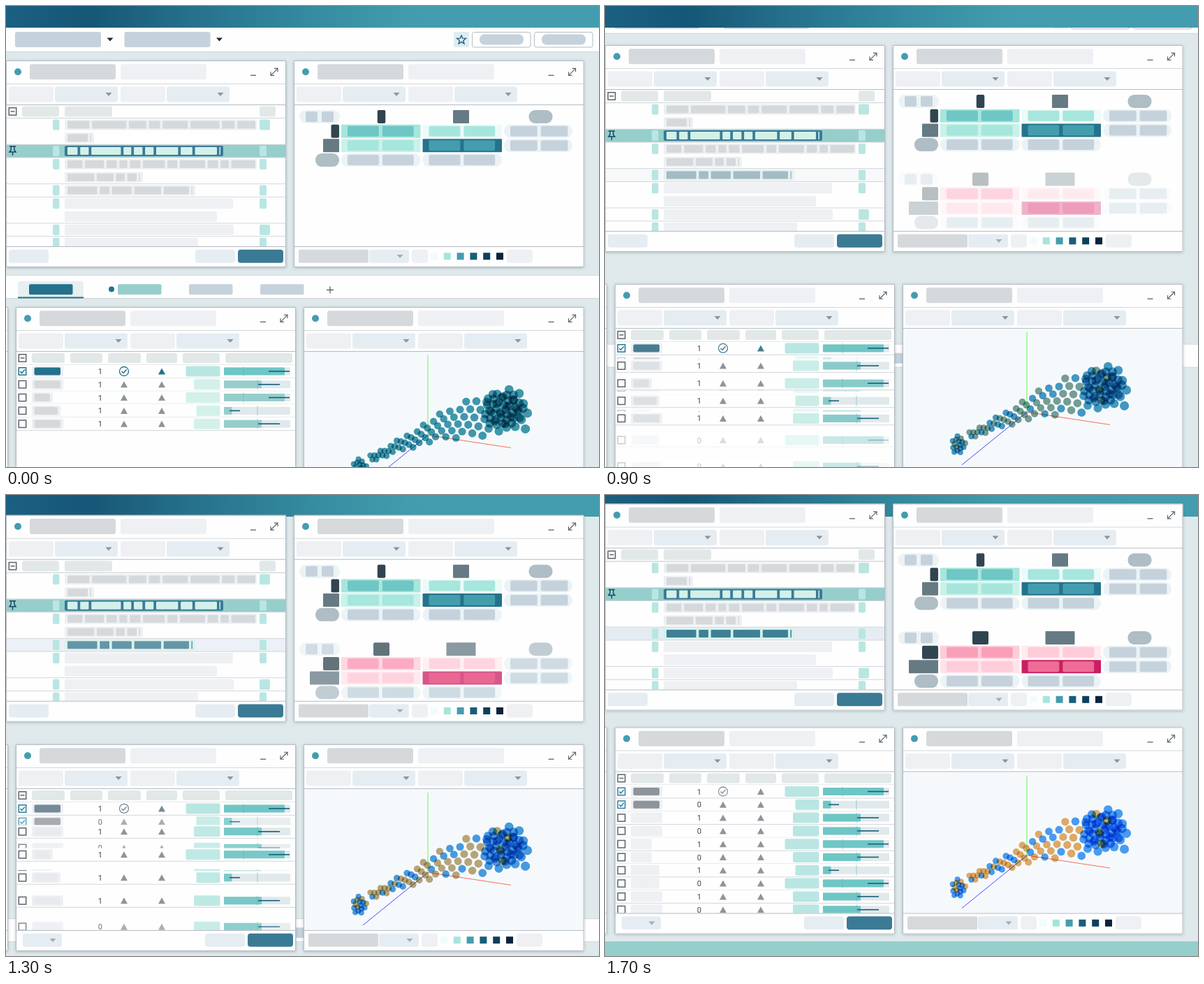
An HTML page with a canvas for the animation above (2000 ms loop, 849 by 660 pixels).

```html
<!DOCTYPE html>
<html lang="en">
<head>
<meta charset="utf-8">
<title>Dashboard transition</title>
<style>
html, body { margin: 0; width: 849px; height: 660px; overflow: hidden; }
canvas { display: block; }
</style>
</head>
<body>
<canvas id="stage" width="849" height="660"></canvas>
<script>
const c = document.getElementById('stage').getContext('2d');

const WHITE = '#fefefe', BG = '#dfe9eb', RULE = '#d3d7da', EDGE = '#b4bbc2';
const GREY = '#d6d9db', PALE = '#eef0f3', MIST = '#e5edf3', SLATE = '#c5d2dc', HEAD = '#e2e8e8';
const TEAL = '#24728c', STEEL = '#3b7a95', SEA = '#96cecc', AQUA = '#b9e6e2', MINT = '#d3f1ea';
const CYAN = '#6ec6c5', OCEAN = '#439dad', NAVY = '#175d7b', INK = '#5c6468', ASH = '#8e949a';
const PITCH = 18.8, FIRST_ROW = 92;

// [tick, progress]; the motion starts abruptly at the first key.
const KEYS = [[20, .07], [24, .204], [30, .463], [39, .752], [45, .911], [51, 1]];

function slope(i) {
  const a = KEYS[Math.max(i - 1, 0)], b = KEYS[Math.min(i + 1, KEYS.length - 1)];
  return (b[1] - a[1]) / (b[0] - a[0]);
}
function progressAt(tick) {
  if (tick < 20) return 0;
  if (tick >= 51) return 1;
  const i = KEYS.findIndex(k => k[0] > tick);
  const [t0, p0] = KEYS[i - 1], [t1, p1] = KEYS[i];
  const d = t1 - t0, s = (tick - t0) / d, r = 1 - s;
  return r * r * ((1 + 2 * s) * p0 + s * d * slope(i - 1)) + s * s * ((3 - 2 * s) * p1 - r * d * slope(i));
}

const fract = x => x - Math.floor(x);
const noise = x => fract(Math.sin(x * 12.9898) * 43758.5453);
const lerp = (a, b, p) => a + (b - a) * p;

function mix(a, b, p) {
  const channel = i => Math.round(lerp(parseInt(a.substr(i, 2), 16), parseInt(b.substr(i, 2), 16), p));
  return `rgb(${channel(1)},${channel(3)},${channel(5)})`;
}

// Rounded box from x0 to x1, centred on y.
function box(x0, x1, y, h, color, r = 2) {
  c.fillStyle = color;
  c.beginPath();
  c.roundRect(x0, y - h / 2, x1 - x0, h, r);
  c.fill();
}
function stroke(color, width, ...paths) {
  c.strokeStyle = color;
  c.lineWidth = width;
  c.beginPath();
  for (const path of paths)
    for (let i = 0; i < path.length; i += 2) c[i ? 'lineTo' : 'moveTo'](path[i], path[i + 1]);
  c.stroke();
}
function outline(x, y, w, h, r, color, width = 1) {
  c.strokeStyle = color;
  c.lineWidth = width;
  c.beginPath();
  c.roundRect(x, y, w, h, r);
  c.stroke();
}
const rule = (x0, x1, y, color = RULE) => stroke(color, 1, [x0, y + .5, x1, y + .5]);
function disc(x, y, r, color) {
  c.fillStyle = color;
  c.beginPath();
  c.arc(x, y, r, 0, 7);
  c.fill();
}
function triangle(x, y, w, h, color) {
  c.fillStyle = color;
  c.beginPath();
  c.moveTo(x - w, y + h / 2);
  c.lineTo(x + w, y + h / 2);
  c.lineTo(x, y - h / 2);
  c.fill();
}
const caret = (x, y, color = ASH) => triangle(x, y, 4.5, -5, color);
function at(x, y, draw) {
  c.save();
  c.translate(x, y);
  draw();
  c.restore();
}
function checkbox(x, y, color, mark) {
  outline(x - 5.2, y - 5.2, 10.4, 10.4, 0, color, 1.5);
  if (mark === 'minus') stroke(color, 1.5, [x - 3, y, x + 3, y]);
  if (mark === 'tick') stroke(color, 1.5, [x - 3, y, x - 1, y + 2.5, x + 3.5, y - 2.5]);
}

function panel(x, y, w, body, footer) {
  at(x, y, () => {
    c.save();
    c.shadowColor = 'rgba(60,85,100,.35)';
    c.shadowBlur = 4;
    c.shadowOffsetY = 1;
    box(0, w, 148, 296, WHITE, 1);
    c.restore();
    body();
    box(0, w, 281, 30, WHITE, 0);
    rule(0, w, 266, EDGE);
    footer();
    disc(17, 16.3, 5, OCEAN);
    box(34, 157, 16.3, 22, GREY, 3);
    box(164, 287, 16.3, 22, PALE, 3);
    const e = w - 17;
    stroke(INK, 1.3, [e - 34, 21.3, e - 26, 21.3]);
    stroke(INK, 1.2, [e - 5, 21.3, e + 5, 11.3], [e, 11.3, e + 5, 11.3, e + 5, 16.3],
      [e - 5, 16.3, e - 5, 21.3, e, 21.3]);
    rule(0, w, 33);
    for (const dx of [0, 160]) {
      box(4 + dx, 68 + dx, 48.5, 22, PALE, 3);
      box(70 + dx, 160 + dx, 48.5, 22, MIST, 3);
      caret(147 + dx, 48.5);
    }
    rule(0, w, 63, EDGE);
    outline(.5, .5, w - 1, 295, 0, EDGE);
  });
}
function actionFooter() {
  box(271, 328, 280.3, 19, MIST, 4);
  box(332, 397, 280.3, 19, STEEL, 4);
}
function legendFooter() {
  box(7, 107, 280.3, 19, GREY, 2);
  box(108, 165, 280.3, 19, MIST, 3);
  caret(152, 280.5, '#a3adb5');
  box(169, 192, 280.3, 19, PALE, 4);
  ['#f1fcfa', '#a6e5dc', OCEAN, NAVY, '#0d3f5b', '#08233a']
    .forEach((color, i) => box(196 + i * PITCH, 206 + i * PITCH, 280.3, 10, color, 0));
  box(305, 342, 280.3, 19, PALE, 4);
}

// A line of words of pseudo-random widths; short lines end in a thin bar.
function words(y, end, seed, fore) {
  const short = end < 350, last = end - (short ? 9 : 2);
  for (let x = 88, i = 0; x < last - 5; i++) {
    const w = 11 + 42 * noise(seed * 10 + i) ** 1.4;
    const stop = x + w > last - 12 ? last : x + w;
    box(x, stop, y, 11, fore, 1);
    x = stop + 3.7;
  }
  if (short) box(end - 5.5, end - 4, y, 11, fore, 0);
}
function list(p) {
  const pinned = 2, changing = 5;
  checkbox(9.5, 73, INK, 'minus');
  for (const [a, b] of [[23, 76], [84, 152], [363, 386]]) box(a, b, 73, 15, HEAD, 3);
  rule(0, 401, 82);
  [359, 126, 311, 359, 196, 271, 325, 302, 326, 275].forEach((end, i) => {
    const y = FIRST_ROW + PITCH * i, continued = i % 3 === 1;
    let back = PALE, fore = GREY;
    if (i === pinned) {
      box(0, 401, y, PITCH, SEA, 0);
      [back, fore] = [STEEL, MINT];
    }
    if (i === changing) {
      box(0, 401, y, PITCH, mix(WHITE, MIST, p), 0);
      [back, fore] = [mix(PALE, MINT, p), mix(GREY, '#3f8096', p)];
    }
    if (!continued) {
      rule(0, 401, y - 9.9);
      box(67, 76.5, y, 15, AQUA);
      box(363, i % 8 ? 373 : 378, y, 15, AQUA);
    }
    box(84, end, y, 15, back);
    if (i <= changing) words(y, end, i + 4, fore);
  });
  stroke('#124560', 1.4, [5, 123, 14, 123], [7.2, 123, 7.2, 128, 5, 131, 14, 131, 11.8, 128, 11.8, 123],
    [9.5, 131, 9.5, 136]);
}

const NEUTRAL = '#ecf3f6';
function cell(col, y, back, fore) {
  const x = 68 + 116.5 * col, w = col === 2 ? 98 : 113.5, inner = w * .395;
  box(x, x + w, y, 19, back, back === NEUTRAL ? 9 : 1);
  for (const dx of [0, inner + 5]) box(x + 9 + dx, x + 9 + dx + inner, y, 15, fore);
}
function matrix(y, labelWidths, [faint, light, soft, mid, strong, core]) {
  const rows = [1, 2, 3].map(i => y + PITCH * 1.1 * i);
  box(8, 66, y, 19, NEUTRAL, 9);
  for (const x of [17, 40]) box(x, x + 17, y, 15, SLATE);
  labelWidths.forEach((w, i) => {
    const x = 125.5 + 114 * i, fill = ['#30454f', '#667a83', '#afbdc5'][i], r = [2, 1, 9][i];
    box(x - w / 2, x + w / 2, y, 19, fill, r);
    box(65 - w, 65, rows[i], 19, fill, r);
  });
  cell(0, rows[0], soft, mid);
  cell(1, rows[0], faint, soft);
  cell(0, rows[1], light, soft);
  cell(1, rows[1], strong, core);
  for (const [col, row] of [[2, 0], [2, 1], [0, 2], [1, 2]]) cell(col, rows[row], NEUTRAL, SLATE);
}
function matrices(p) {
  matrix(80.5, [11.5, 23, 34], ['#ecfbf9', '#c9f2ea', '#a6e6dc', CYAN, TEAL, OCEAN]);
  c.globalAlpha = p;
  matrix(192, [23, 42, 34], ['#ffebf0', '#ffe3ea', '#ffccd9', '#fa9fba', '#c91f63', '#ee6d97']);
  c.globalAlpha = 1;
}

const BARS = {
  high: { box: 243.5, fill: 385, from: 362, length: 30, tick: 326 },
  half: { box: 255, fill: 352, from: 347, length: 31, tick: 346 },
  low: { box: 258.5, fill: 309.5, from: 306, length: 15, tick: 346 }
};
const NAME_ENDS = [68, 68, 53, 64, 68];
const ROWS = ['high', 'half', 'high', 'low', 'half'];
const ADDED_ROWS = ['low', 'half', 'half', 'high', 'half'];

function tableRow(y, i, kind, added, p) {
  const bar = BARS[kind], first = i === 0, lead = first && !added, q = added ? 1 : p;
  const accent = lead ? mix(TEAL, ASH, p) : ASH;
  box(1, 400, y, PITCH, WHITE, 0);
  rule(1, 400, y + 9);
  checkbox(9.5, y, first ? mix(TEAL, '#2e82a4', q) : INK, first ? 'tick' : '');
  box(23, NAME_ENDS[i], y, 15, PALE);
  box(26.5, NAME_ENDS[i] - 4, y, 11, first ? mix(TEAL, ASH, q) : mix(GREY, PALE, q));
  c.fillStyle = '#3c4347';
  c.font = '11px Roboto, sans-serif';
  c.textAlign = 'right';
  c.fillText(added ? '0' : '1', 124, y + 4);
  if (lead) {
    outline(148.5, y - 6.5, 13, 13, 6.5, accent, 1.3);
    stroke(accent, 1.5, [151.5, y, 154, y + 2.5, 158.5, y - 2.5]);
  } else triangle(155, y, 5, 9, ASH);
  triangle(209, y, 5, 9, accent);
  box(bar.box, 292.5, y, 15, lead ? AQUA : mix(MINT, AQUA, q));
  box(298, 393, y, 11, '#e0e9eb', 1);
  box(298, bar.fill, y, 11, lead ? CYAN : mix(SEA, CYAN, q), 1);
  stroke('rgba(110,180,185,.6)', 1, [bar.tick, y - 7.5, bar.tick, y + 7.5]);
  stroke(NAVY, 1.6, [bar.from, y, bar.from + bar.length, y]);
}
// Existing rows spread apart and uncover added rows that fade in between them.
function table(p) {
  checkbox(9.5, 73, INK, 'minus');
  for (const [a, b] of [[23, 70], [78, 124], [132, 179], [187, 231], [239, 292], [300, 396]])
    box(a, b, 73, 14, HEAD, 3);
  rule(0, 401, 82);
  c.globalAlpha = p;
  ADDED_ROWS.forEach((kind, i) => tableRow(FIRST_ROW + PITCH * (2 * i + 1), i, kind, true, p));
  c.globalAlpha = 1;
  ROWS.forEach((kind, i) => tableRow(FIRST_ROW + PITCH * i * (1 + p), i, kind, false, p));
}

// A widening stream of dots with a dense cluster at each end.
const dots = [];
function cluster(count, x, y, rx, ry, warmEvery) {
  for (let i = 0; i < count; i++) {
    const r = Math.sqrt((i + .5) / count), a = i * 2.4;
    dots.push([x + rx * r * Math.cos(a), y + ry * r * Math.sin(a), i % warmEvery === 1]);
  }
}
function stream(count) {
  for (let i = 0; i < count; i++) {
    const s = (i + .5) / count, spread = 6 + 90 * s * s * (1.25 - s);
    const across = 2 * fract(i * .618) - 1;
    dots.push([94 + 228 * s, 219 - 72 * Math.sin(s * Math.PI / 2) + spread * across,
      s < .7 && noise(i) < .6]);
  }
}
cluster(16, 80, 230.5, 11, 13, 3);
stream(78);
cluster(36, 286, 147, 29, 27, 9);

function scatter(p) {
  box(1, 400, 165, 202, '#f6f9fc', 0);
  stroke('#7cf573', 1.2, [178, 69, 178, 183.5]);
  stroke('#f5705c', 1, [178, 183.5, 297, 201.5]);
  stroke('#4a4af5', 1, [178, 183.5, 85, 259]);
  const cool = mix('#429bad', '#4b9ff2', p), warm = mix('#429bad', '#e3ad69', p);
  c.globalCompositeOperation = 'multiply';
  for (const [x, y, isWarm] of dots) disc(x, y, 3.1 + x / 92, isWarm ? warm : cool);
  c.globalCompositeOperation = 'source-over';
}

function toolbar() {
  box(0, 849, 48, 34, WHITE, 0);
  rule(0, 849, 65);
  for (const x of [13, 169.5]) {
    box(x, x + 123, 48, 22, SLATE, 3);
    caret(x + 136, 48, '#20292e');
  }
  box(641, 663, 48, 22, '#e0ecf0', 2);
  const star = [];
  for (let i = 0; i <= 10; i++) {
    const r = i % 2 ? 2.9 : 6.8, a = i * Math.PI / 5;
    star.push(652 + r * Math.sin(a), 48.5 - r * Math.cos(a));
  }
  stroke(NAVY, 1.3, star);
  for (const x of [667.5, 756.5]) {
    outline(x, 37.5, 83.5, 21.5, 3, EDGE);
    box(x + 10.5, x + 73.5, 48, 15, SLATE, 7);
  }
}
function tabs() {
  box(0, 849, 16, 33, WHITE, 0);
  rule(0, 849, -1);
  rule(0, 849, 32);
  box(17, 111, 20, 24, '#e7eff1', [4, 4, 0, 0]);
  box(17, 111, 31.5, 2, TEAL, 0);
  disc(151, 19.5, 4, TEAL);
  [[33, TEAL], [160, SEA], [262, SLATE], [364, SLATE]]
    .forEach(([x, color]) => box(x, x + 62.5, 19.7, 15, color));
  stroke(INK, 1.3, [459, 20.5, 469, 20.5], [464, 15.5, 464, 25.5]);
}

const banner = c.createLinearGradient(0, 0, 849, 0);
[[0, '#1b6082'], [.14, '#165676'], [.3, '#256f8b'], [.5, '#34899e'], [.68, '#429cad'], [1, '#439dae']]
  .forEach(([stop, color]) => banner.addColorStop(stop, color));

function draw(p) {
  const top = lerp(78, 12.5, p), low = lerp(431, 332.5, p);
  box(0, 849, 330, 660, BG, 0);
  at(0, -78 * p, toolbar);
  box(0, 849, 15.5, 31, banner, 0);
  at(0, lerp(386, 680, p), tabs);
  if (p) box(0, 849, lerp(745, 660, p), 42, SEA, 0);
  panel(0, top, 401, () => list(p), () => {
    box(4, 61, 280.3, 19, MIST, 4);
    actionFooter();
  });
  panel(412, top, 415.5, () => matrices(p), legendFooter);
  panel(-398, low, 401, () => {}, () => {});
  panel(14, low, 401, () => table(p), () => {
    box(10, 66, 280.3, 19, MIST, 3);
    caret(53, 280.5, '#a3adb5');
    actionFooter();
  });
  panel(426, low, 401.5, () => scatter(p), legendFooter);
}

// The picture advances at 30 ticks per second.
const start = performance.now();
function frame() {
  const t = (performance.now() - start) % 2000;
  draw(progressAt(Math.floor((t + 6.7) * .03)));
  requestAnimationFrame(frame);
}
frame();
</script>
</body>
</html>
```
